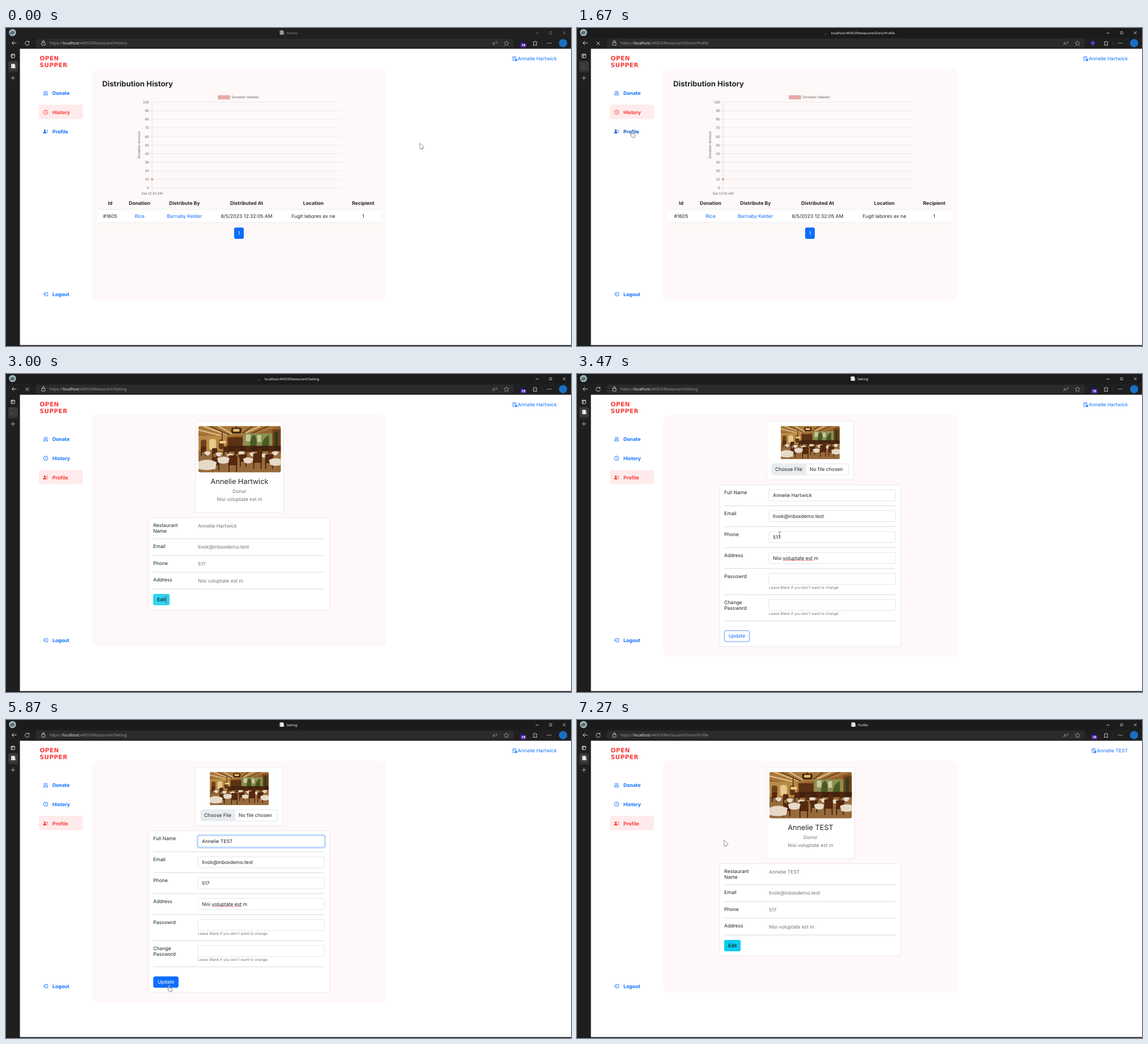
Animation, 998 px wide and 561 px high, one loop 8000 ms. Source, as an HTML page:

```html
<!DOCTYPE html>
<html lang="en">
<head>
<meta charset="utf-8">
<title>Donation history</title>
<style>
  html, body { margin: 0; width: 100%; height: 100%; overflow: hidden; background: #fff; }
  svg { display: block; }
  text { font-family: Inter, "Open Sans", sans-serif; text-rendering: geometricPrecision; white-space: pre; }
  .ui { font-family: "Open Sans", "Noto Sans", sans-serif; }
  .chart { font-family: "Liberation Sans", Arial, sans-serif; }
  .logo { font-family: "DejaVu Sans", sans-serif; font-weight: 700; letter-spacing: .4px; }
  .b { font-weight: 700; }
  .m { text-anchor: middle; }
  .e { text-anchor: end; }
</style>
</head>
<body>
<svg id="stage" width="998" height="561" viewBox="0 0 998 561"></svg>
<script>
const stage = document.getElementById('stage');
const BLUE = '#0d6efd', RED = '#fb3838', INK = '#212529', GREY = '#6c757d', BORDER = '#dcdcde';
const FIRST = 'Annelie ', LAST = 'Hartwick', MAIL = 'tivok@inboxdemo.test', PHONE = '517';
const SIZE = 8.6;

const ctx = document.createElement('canvas').getContext('2d');
ctx.font = '86px Inter, "Open Sans", sans-serif';
const width = s => ctx.measureText(s).width * SIZE / 86;

const text = (x, y, s, cls = '', fill = INK, size = SIZE) =>
  `<text x="${x}" y="${y + size * .36}" class="${cls}" fill="${fill}" font-size="${size}">${s}</text>`;
const box = (x, y, w, h, fill, rx = 0, stroke = 'none', sw = .6) =>
  `<rect x="${x}" y="${y}" width="${w}" height="${h}" rx="${rx}" fill="${fill}" stroke="${stroke}" stroke-width="${sw}"/>`;
const dot = (x, y, r, fill, stroke = 'none') =>
  `<circle cx="${x}" cy="${y}" r="${r}" fill="${fill}" stroke="${stroke}" stroke-width=".9"/>`;
const line = (d, stroke, sw = .9, fill = 'none') =>
  `<path d="${d}" stroke="${stroke}" stroke-width="${sw}" fill="${fill}"/>`;
const at = (x, y, s) => `<g transform="translate(${x} ${y})">${s}</g>`;
const rule = y => line(`M260 ${y}H562.5`, '#c9cacc', .7);
const within = (t, a, b) => t >= a && t < b;

// Pointer path: time, x, y
const MOVES = [
  [0, 731, 203], [330, 153, 179], [530, 153, 179], [1330, 97, 181.5], [1870, 97, 181.5],
  [2330, 190, 290], [2870, 283, 398], [3000, 283, 398], [3200, 284, 338], [3800, 458, 211],
  [3990, 458, 211], [4130, 385, 219], [4270, 385, 219], [4330, 381.5, 220], [4470, 377, 220],
  [5070, 377, 220], [5730, 287, 474], [5870, 288, 467.5], [5930, 288, 467.5], [6200, 281, 446],
  [6800, 380, 265], [7270, 259.6, 211.8], [8000, 259.6, 211.8]
];

function pointer(t) {
  const i = Math.max(1, MOVES.findIndex(m => m[0] >= t));
  const [t0, x0, y0] = MOVES[i - 1], [t1, x1, y1] = MOVES[i];
  const u = (t - t0) / (t1 - t0), k = u * u * (3 - 2 * u);
  return [x0 + (x1 - x0) * k, y0 + (y1 - y0) * k];
}

const CURSORS = {
  arrow: line('M0 0V10.5H4.5L7.5 7Z', '#858590', .9, '#fff') + line('M3.2 10L6.2 8', '#c9a25e', 1.6),
  hand: line('M-1 1a1 1 0 0 1 2 0V5l3.6 .9q1.2.4 1 2L4.8 11.5H.4L-2.5 7.4q.1-1.4 1.5-.6z', '#444', .7, '#fff'),
  beam: line('M-2-5.5Q0-5.5 0-4.5 0-5.5 2-5.5M0-4.5V4.5M-2 5.5Q0 5.5 0 4.5 0 5.5 2 5.5', '#666', .9)
};

const pageIcon = (x, y, c) => at(x, y, box(-3.5, -3.7, 6.5, 7.7, c, .8) + line('M-2-3.7V4', '#8a8a8a', .6) + line('M3.3-2L4.2 4', c, .8));

function spinner(x, y, k) {
  const a = (135 - (k - 2) * 24) * Math.PI / 180;
  return dot(x + 3.2 * Math.cos(a), y + 3.2 * Math.sin(a), .8, '#5ea0ef');
}

function browser(t, s) {
  const lit = t >= 1530, main = lit ? '#fff' : '#8c8c8c', tint = '#e3e3e3';
  const name = { History: 'History', DonorProfile: 'Profile', Setting: 'Setting' }[s.path];
  const title = s.loading ? 'localhost:44353/Restaurant/' + s.path : name;
  const iconX = s.loading ? (s.path == 'Setting' ? 449 : 441) : name == 'Profile' ? 488 : 487;
  return box(0, 0, 998, 36.6, '#1f1f1f') + box(0, 36, 24.6, 525, '#1f1f1f') + box(0, 559.4, 998, 1.6, '#1a1a1a')
    + box(0, 0, 998, 17, lit ? '#1b1b1b' : '#202020')
    + dot(11.5, 8, 6.3, '#9fb4ba') + line('M7 10q3-7 8-3-1 5-4 4z', '#47575d', .5, '#5c6d73')
    + (s.loading ? spinner(iconX, 8.5, s.spin) + spinner(12.5, 67, s.spin) : pageIcon(iconX, 8, lit ? '#eee' : '#999'))
    + text(505, 8.5, title, 'ui m', lit ? '#fff' : '#969696', 5.9)
    + line('M935.5 9H941', main, .7) + box(960, 6.5, 4, 4, 'none', .7, main, .7)
    + line('M983.5 6L988.5 11M988.5 6L983.5 11', main, .7)
    + line('M18.5 26.5H10.5M14 23L10.5 26.5 14 30', tint)
    + (s.loading ? line('M34.5 24L40.5 30M40.5 24L34.5 30', tint)
      : line('M40.3 24.5A3.7 3.7 0 1 0 41.2 27M40.8 22.7V25H38.4', tint))
    + box(53, 19, 844, 15, '#2b2b2b', 4)
    + box(63, 25.5, 6, 4.7, 'none', .8, tint, .8) + line('M64.3 25.5V24a1.7 1.7 0 0 1 3.4 0V25.5', tint, .8)
    + text(77, 26.7, `https://<tspan fill="#fff">localhost</tspan>:44353/Restaurant/${s.path}`, 'ui', '#a0a0a0', 6.9)
    + text(859, 27, 'A', 'ui', '#b5b5b5', 7.5) + line('M864.5 24q2 1 0 3M866 23q3 2 0 5', '#b5b5b5', .6)
    + line('M884 22.8l1.3 2.7 2.9.4-2.1 2 .5 2.9-2.6-1.4-2.6 1.4.5-2.9-2.1-2 2.9-.4z', '#b5b5b5', .7)
    + `<g transform="rotate(45 911 26.5)">${box(908, 23.5, 6, 6, s.badge ? '#20186e' : '#5a35e0')}</g>`
    + (s.badge ? box(909, 27, 9.8, 7, '#5b2bb5', 1.5) + text(914, 30.4, '18', 'ui m b', '#fff', 5.6) : '')
    + line('M931.5 24.5h2a1.2 1.2 0 1 1 2.4 0h1.6v2a1.2 1.2 0 1 0 0 2.4v1.6h-6v-1.6a1.2 1.2 0 1 0 0-2.4z', tint, .8)
    + line('M947 22.5V31', '#444', .6)
    + [956.5, 959.5, 962.5].map(x => dot(x, 26.7, .8, tint)).join('')
    + dot(984, 26.7, 7.2, '#1a6fc4')
    + box(9, 46, 6.5, 6.5, 'none', 1, tint, .9) + line('M9 47.5H15.5M11 47V52.5', tint, .9)
    + box(4, 58.5, 17, 17.5, '#3a3a3a', 3) + (s.loading ? spinner(12.5, 67, s.spin) : pageIcon(12.5, 67, '#eee'))
    + line('M4 77.5H21', '#555', .6) + line('M8.5 88H16M12.2 84.3V91.7', '#c9c9c9', .8);
}

const NAV_ICONS = {
  Donate: c => line('M-3.5-3H3.5M-3.5-1H3.5M-3.5 3.3H3.5V1H-3.5Z', c, .8),
  History: c => dot(0, 0, 3.8, 'none', c) + line('M0-2.3V.3L1.7 1.6', c, .8),
  Profile: c => dot(-1.5, -1.7, 1.7, c) + line('M-4.2 3.3q0-2.9 2.7-2.9T1.2 3.3z', c, .3, c) + line('M1.5-2H4M2 0H4M2.3 2H4', c, .8),
  Logout: c => line('M-1.5-1.5V-3H3.7V3H-1.5V1.5M1.5 0H-4M-2.3-1.6L-4 0-2.3 1.6', c, .8)
};

function navItem(label, y, active, hover) {
  const c = active ? RED : hover ? '#0a58ca' : BLUE;
  return (active ? box(58, y - 13.5, 78, 25.7, '#ffebeb', 4) : '')
    + at(70, y, NAV_ICONS[label](c)) + text(82, y, label, 'b', c, 8.7);
}

function frame(s, hoverProfile) {
  const user = FIRST + s.last, x = 973 - width(user) - 9.3;
  return text(59.5, 53, 'OPEN', 'logo', RED, 10.5) + text(59.5, 65.5, 'SUPPER', 'logo', RED, 10.5)
    + navItem('Donate', 115, false) + navItem('History', 148.6, s.page == 'history')
    + navItem('Profile', 182.4, s.page != 'history', hoverProfile) + navItem('Logout', 469.6, false)
    + at(x, 50, box(.5, .3, 5.5, 7.4, 'none', .5, BLUE, .8) + line('M2 2.4H4.6M2 4.2H4.6', BLUE, .8) + dot(6.4, 6.4, 1.7, BLUE))
    + text(973, 54.2, user, 'e', BLUE)
    + box(152, 72, 520, s.page == 'setting' ? 427 : 409, '#fff8f8', 9);
}

function history() {
  let out = text(170, 98, 'Distribution History', 'b', INK, 13.1)
    + box(374.5, 119, 21, 6.5, '#e6abab', 0, '#dd9e9e') + text(398.5, 122, 'Donation Statistic', 'chart', '#666', 6.24);
  for (let i = 0; i <= 10; i++) {
    const y = 282 - i * 15.12;
    out += line(`M254 ${y}H592`, '#e3dcdc', .6) + text(252.5, y, i * 10, 'chart e', '#666', 6.24);
  }
  const heads = ['Id', 'Donation', 'Distribute By', 'Distributed At', 'Location', 'Recipient'];
  const cells = ['#1605', 'Rice', 'Barnaby Kelder', '8/5/2023 12:32:05 AM', 'Fugit labores ex ne', '1'];
  const cols = [184, 236, 315.3, 425, 543, 631];
  out += line('M258 131V286', '#d3cccc', .6) + dot(258, 267, 1.6, '#dfa0a0', '#d28f8f')
    + text(258, 291.3, 'Sat 12:31 AM', 'chart m', '#666', 6.24)
    + `<g transform="translate(234.5 206.5) rotate(-90)">${text(0, 0, 'Donation Amount', 'chart m', '#666', 6.24)}</g>`
    + box(162, 320, 500, 23.5, '#fff') + line('M162 320H662M162 343.5H662', '#dee2e6', .6);
  cols.forEach((x, i) => {
    out += text(x, 309, heads[i], 'm b')
      + text(x, 331.5, cells[i], 'm', i == 1 || i == 2 ? BLUE : INK);
  });
  return out + box(403, 352, 17, 20, BLUE, 3) + text(411.5, 362, '1', 'm', '#fff');
}

// Dining room in flat shapes
function photo(x, y, w) {
  const table = (x, y, r) => line(`M${x - r} ${y}q${r}-${r * .5} ${2 * r} 0l-2 ${r * .7}q-${r - 2} 4-${2 * r - 4} 0z`, 'none', 0, '#e6d9c6');
  const chair = (x, y, h) => box(x, y, h * .55, h * .6, '#54290f', 2) + line(`M${x + 1} ${y + h * .5}V${y + h}M${x + h * .5} ${y + h * .5}V${y + h}`, '#371a0a', 1.6);
  return `<svg x="${x}" y="${y}" width="${w}" height="${w * .563}" viewBox="0 0 146 82">
    <clipPath id="round"><rect width="146" height="82" rx="3.5"/></clipPath><g clip-path="url(#round)">`
    + box(0, 0, 146, 82, '#94602a')
    + line('M0 0H146L100 14 45 20 0 14Z', 'none', 0, '#a8763a')
    + line('M8 0L52 16M35 0L60 14M110 0L84 12M0 7L45 18', '#dcb981', 2.4)
    + line('M20 0L55 16M95 0L78 13M125 0L92 14', '#5d3616', 1.6)
    + box(0, 17, 50, 27, '#b98a48') + box(4, 24, 10, 18, '#6e421b', 4) + box(19, 23, 12, 19, '#e6ca8a', 4) + box(36, 24, 9, 17, '#5f3716', 4)
    + box(52, 20, 26, 22, '#5c3114') + box(79, 13, 52, 24, '#8b8f52') + line('M92 37q-2-15 6-22 8 6 4 22M112 36q2-16 13-20v20', 'none', 0, '#485a22')
    + line('M84 15h8v12h-8zM104 16h7v12h-7z', 'none', 0, '#ccc79a')
    + box(131, 6, 15, 45, '#74401a') + box(135, 10, 6, 30, '#2e3d1a')
    + line('M67 0V7M42 10V28', '#2a170b', 1.2) + box(58, 3, 18, 10, '#3c230f', 3) + box(61, 5, 12, 5, '#e2b76a', 2) + box(37, 26, 12, 5, '#f0ca7d', 2)
    + box(50, 35, 96, 12, '#41220f') + line('M0 46L146 44V82H0Z', 'none', 0, '#976a3c')
    + [0, 1, 2, 3, 4, 5, 6].map(i => chair(4 + i * 20, 36 + i % 2 * 3, 17) + table(16 + i * 20, 46 + i % 3 * 2, 6)).join('')
    + chair(24, 55, 24) + chair(53, 52, 29) + chair(73, 50, 22) + chair(97, 48, 28) + chair(118, 50, 26)
    + table(15, 64, 17) + table(44, 57, 11) + table(88, 58, 9) + table(137, 60, 12)
    + '</g></svg>';
}

const card = (x, y, w, h) => box(x, y, w, h, '#fff', 3, BORDER);

function profile(s, hoverEdit) {
  const user = FIRST + s.last, addr = 'Nisi voluptate est m';
  const rows = [['Email', MAIL, 304, 320.3], ['Phone', PHONE, 333.7, 349.7], ['Address', addr, 363.3, 379.3]];
  return card(335, 83, 155.5, 161.3) + photo(340, 91.7, 145.5)
    + text(412.5, 189, user, 'm', INK, 12.7) + text(412.5, 206.5, 'Donor', 'm', GREY) + text(412.5, 221, addr, 'm', GREY)
    + card(252, 253.5, 319.5, 163) + text(260, 267, 'Restaurant') + text(260, 276.8, 'Name') + text(339, 267.7, user, '', GREY) + rule(290.7)
    + rows.map(([label, value, y, end]) => text(260, y, label) + text(339, y + 1.2, value, '', GREY) + rule(end)).join('')
    + box(260, 388, 29, 20, hoverEdit ? '#31d2f2' : '#0dcaf0', 3) + text(274.6, 397.8, 'Edit', 'm', '#000');
}

function squiggle(x, w) {
  let d = `M${x} 329.5`;
  for (let i = 0; i < w / 1.5; i++) d += `l1.5 ${i % 2 ? 1.4 : -1.4}`;
  return line(d, '#e03030', .7);
}

function nameField(t) {
  const focus = within(t, 4000, 5930);
  const picked = t < 4070 || t >= 4670 ? 0 : t < 4130 ? 3 : t < 4330 ? 6 : t < 4400 ? 7 : 8;
  const typed = t < 4670 ? LAST : 'TEST'.slice(0, t < 4800 ? 1 : t < 4930 ? 2 : t < 5130 ? 3 : 4);
  const cut = typed.length - picked, head = FIRST + typed.slice(0, cut), tail = typed.slice(cut);
  return (focus ? box(338, 203, 226, 22.5, '#fff', 3.5, '#c2dbfe', 2.4) : '')
    + box(339, 204, 223.7, 20, '#fff', 3, focus ? '#86b7fe' : '#ced4da')
    + (picked ? box(346 + width(head), 208, width(tail), 12.3, '#2f62c8') : '')
    + text(346, 213.8, `${head}<tspan fill="#fff">${picked ? tail : ''}</tspan>${picked ? '' : tail}`);
}

// Tops of the form fields
const FIELDS = [204, 241.2, 278, 314.8, 351.7, 397.8];

function setting(t, hoverUpdate) {
  const input = (i, s = '') => box(339, FIELDS[i], 223.7, 19.6, '#fff', 3, '#ced4da') + text(346, FIELDS[i] + 9.8, s);
  const hint = y => text(339, y, "Leave Blank if you don't want to change", '', GREY, 6.5);
  const words = ['Nisi ', 'voluptate', ' ', 'est', ' m'];
  const w1 = 346 + width(words[0]), w2 = 346 + width(words.slice(0, 3).join(''));
  return card(335, 83, 153.5, 103.5) + photo(360, 91.7, 104)
    + box(344, 158.3, 135.5, 19.7, '#fff', 3, '#ced4da') + box(344.3, 158.6, 60, 19.1, '#e9ecef', 2.5) + line('M404.3 158.5V178', '#ced4da', .6)
    + text(374, 168.2, 'Choose File', 'm') + text(411, 168.2, 'No file chosen')
    + card(252, 195.5, 319.5, 285.3)
    + text(260, 209, 'Full Name') + nameField(t) + rule(232.5)
    + text(260, 246, 'Email') + input(1, MAIL) + rule(269.3)
    + text(260, 283, 'Phone') + input(2, PHONE) + rule(306.3)
    + text(260, 320, 'Address') + input(3, words.join('')) + squiggle(w1, width(words[1])) + squiggle(w2, width(words[3])) + rule(343.2)
    + text(260, 356.7, 'Passowrd') + input(4) + hint(376.3) + rule(389.4)
    + text(260, 403, 'Change') + text(260, 412.8, 'Password') + input(5) + hint(422.4) + rule(435.5)
    + box(260.4, 452.7, 44, 19.3, hoverUpdate ? BLUE : '#fff', 3, BLUE, .7)
    + (t >= 5930 ? box(259.4, 451.7, 46, 21.3, 'none', 4, '#9ec5fe', 1.6) : '')
    + text(282.4, 462.3, 'Update', 'm', hoverUpdate ? '#fff' : BLUE);
}

function render(t) {
  const start = [6000, 2870, 1530].find(a => t >= a), end = { 1530: 1800, 2870: 3130, 6000: 6130 }[start];
  const s = {
    page: t < 1800 ? 'history' : t < 3130 || t >= 6130 ? 'profile' : 'setting',
    path: t < 1530 ? 'History' : t < 2870 || t >= 6130 ? 'DonorProfile' : 'Setting',
    loading: t < end,
    spin: (t - start) * .015,
    badge: !(within(t, 1600, 2000) || within(t, 3070, 3200) || within(t, 6070, 6200)),
    last: t < 6130 ? LAST : 'TEST'
  };
  const [x, y] = pointer(t);
  const over = (l, top, r, b) => x > l && x < r && y > top && y < b;
  const onNav = over(58, 169, 136, 195);
  const onEdit = s.page == 'profile' && over(260, 388, 289, 408);
  const onUpdate = s.page == 'setting' && over(260, 452, 305, 472);
  const onInput = s.page == 'setting' && FIELDS.some(top => over(339, top, 563, top + 20));
  const kind = onNav || onUpdate ? 'hand' : onEdit || onInput ? 'beam' : 'arrow';
  const content = s.page == 'history' ? history() : s.page == 'profile' ? profile(s, onEdit) : setting(t, onUpdate);
  const status = onNav && within(t, 1070, 1530)
    ? box(25, 548, 141, 12, '#2b2b2b', 2) + text(29, 554, 'https://localhost:44353/Restaurant/DonorProfile', 'ui', '#d0d0d0', 5.9) : '';
  stage.innerHTML = box(0, 0, 998, 561, '#fff') + frame(s, onNav) + content + browser(t, s) + status + at(x, y, CURSORS[kind]);
}

// The screen refreshes 15 times a second
let shown = -1;
function tick() {
  const n = Math.floor(performance.now() % 8000 * .015 + .1) % 120;
  if (n != shown) render(Math.round(n / .15) * 10);
  shown = n;
  requestAnimationFrame(tick);
}
tick();
</script>
</body>
</html>
```
